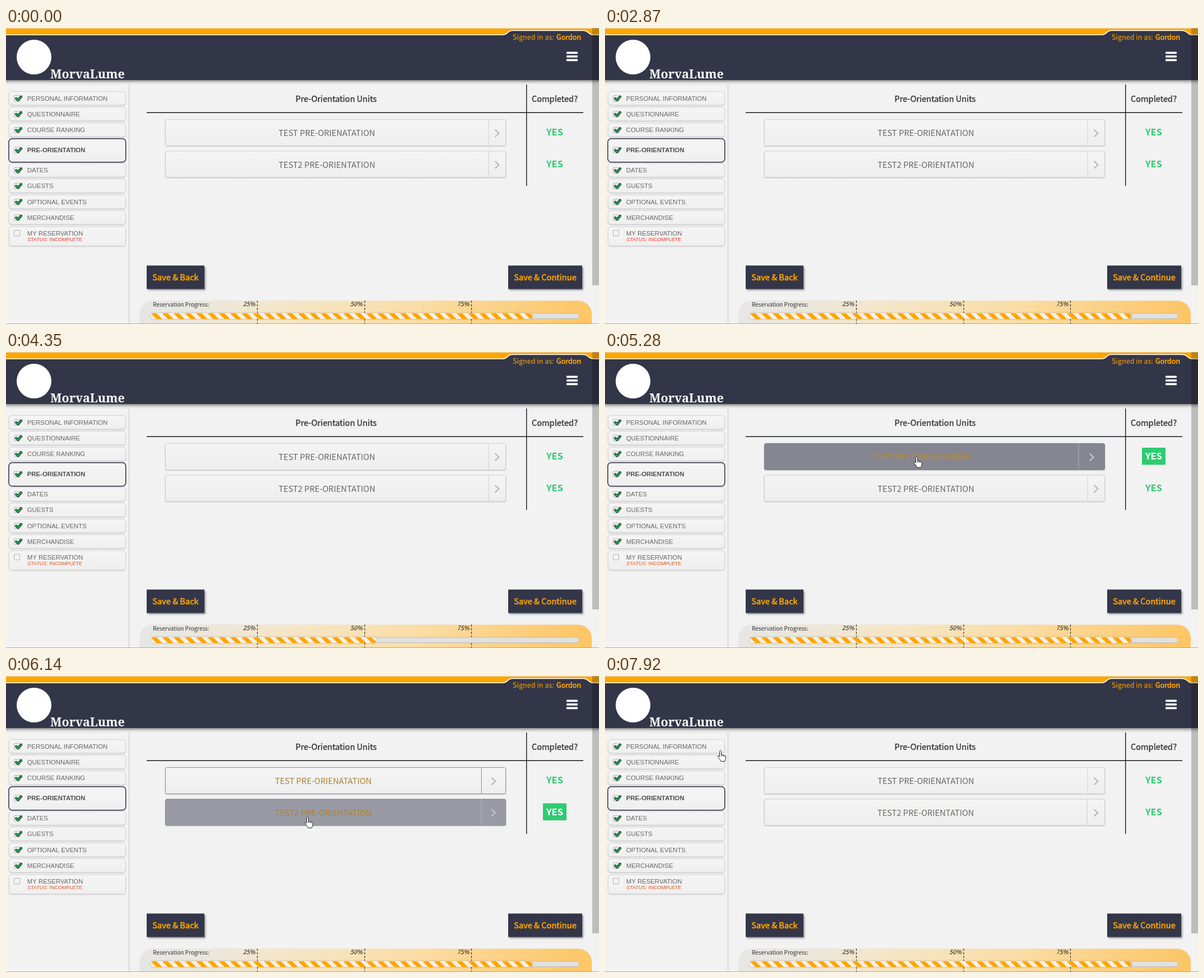
Animation, 1058 px wide and 529 px high, one loop 8000 ms. Source, as an HTML page with a canvas:

```html
<!DOCTYPE html>
<html lang="en">
<head>
<meta charset="utf-8">
<title>Pre-Orientation</title>
<style>
html, body { margin: 0; width: 100%; height: 100%; overflow: hidden; background: #f2f2f2; }
canvas { display: block; width: 1058px; height: 529px; }
</style>
</head>
<body>
<canvas id="stage" width="1058" height="529"></canvas>
<script>
const ctx = document.getElementById('stage').getContext('2d');
const LOOP = 8000, FADE = 600;
const NAVY = '#333648', GOLD = '#ffa500', GREEN = '#2ecc71';
const SANS = '"Noto Sans CJK SC", "Noto Sans CJK JP", "Noto Sans CJK", "Open Sans", sans-serif';
const ARIAL = '"Liberation Sans", Arial, sans-serif';
const SERIF = '"Noto Serif", serif';

// Bursts of motion: start, end, step count
const bursts = [
  [310, 1080, 11], [1160, 1160, 1], [1540, 2310, 11], [2390, 2870, 7],
  [3870, 4670, 11], [4740, 5510, 11], [5630, 5680, 2], [5830, 6530, 10],
  [6990, 7770, 11], [7850, 7920, 2]
];

// Pointer paths: time, x, y
const paths = [
  [[310, 715, 528], [1080, 158, 13], [1159, 101, -40]],
  [[1540, 145, 5], [1770, 96, 58], [1925, 52, 95], [2080, 37, 82], [2310, 82, 46],
   [2390, 96, 39], [2790, 80, 7], [2869, 77, -20]],
  [[4590, 80, -40], [4740, 260, 46], [5080, 505, 163], [5280, 556, 187], [5830, 556, 187],
   [6140, 538, 252], [6990, 538, 253], [7440, 284, 228], [7770, 223, 145],
   [7920, 206, 133], [8000, 206, 133]]
];

const rows = [
  { y: 164, label: 'TEST PRE-ORIENATATION', hover: [[784, 856], [5080, 5950]] },
  { y: 220.5, label: 'TEST2 PRE-ORIENTATION', hover: [[701, 771], [5975, 7440]] }
];

const nav = [
  ['PERSONAL INFORMATION', 113, 25], ['QUESTIONNAIRE', 141, 25], ['COURSE RANKING', 169.5, 25],
  ['PRE-ORIENTATION', 197, 42], ['DATES', 241.5, 25], ['GUESTS', 269.5, 25],
  ['OPTIONAL EVENTS', 298, 25], ['MERCHANDISE', 326, 25], ['MY RESERVATION', 354.5, 35]
];

const hand = new Path2D('M3.5 1.8c0-2 3-2 3 0v5.7l6 1.5q2.5 .6 2 3l-.8 4.5-1.2 3h-6.7l-1.2-2.8-4-5q-1.3-2.4 1.5-2.2l1.4 1.7z');
const arrow = new Path2D('M.5 .8v14.2l3.3-3.1 2.2 4.7 2.2-1-2.2-4.6h4.5z');

const clamp = v => Math.max(0, Math.min(1, v));
const lerp = (a, b, p) => a + (b - a) * p;
const swing = p => 0.5 - Math.cos(clamp(p) * Math.PI) / 2;
const mix = (a, b, p) => `rgb(${a.map((v, i) => Math.round(lerp(v, b[i], p)))})`;

// CSS "ease": cubic-bezier(.25, .1, .25, 1)
function ease(x) {
  x = clamp(x);
  let lo = 0, hi = 1;
  for (let i = 0; i < 20; i++) {
    const s = (lo + hi) / 2;
    const bx = 0.75 * s * (1 - s) + s * s * s;
    if (bx < x) lo = s; else hi = s;
  }
  return 0.3 * lo * (1 - lo) * (1 - lo) + 3 * lo * lo * (1 - lo) + lo * lo * lo;
}

function snap(t) {
  let held = 0;
  for (const [a, b, n] of bursts) {
    if (t < a) break;
    const step = n > 1 ? (b - a) / (n - 1) : 1;
    held = Math.min(b, a + Math.floor((t - a + 3) / step) * step);
  }
  return held;
}

function pointer(t) {
  for (const path of paths) {
    for (let i = 1; i < path.length; i++) {
      const [t0, x0, y0] = path[i - 1], [t1, x1, y1] = path[i];
      if (t >= t0 && t <= t1) {
        const p = (t - t0) / (t1 - t0);
        return { x: lerp(x0, x1, p), y: lerp(y0, y1, p) };
      }
    }
  }
  return null;
}

function hoverState(row, t) {
  let level = 0, on = false;
  for (const [a, b] of row.hover) {
    if (t < a) break;
    on = t < b;
    level = ease((Math.min(t, b) - a) / FADE);
    if (!on) level *= 1 - ease((t - b) / (FADE * level));
  }
  return { level, on };
}

function text(s, x, y, font, color, { align = 'left', heavy = 0 } = {}) {
  ctx.font = font;
  ctx.textAlign = align;
  ctx.fillStyle = color;
  ctx.fillText(s, x, y);
  if (heavy) {
    ctx.strokeStyle = color;
    ctx.lineWidth = heavy;
    ctx.strokeText(s, x, y);
  }
}

function box(x, y, w, h, r, fill, stroke, lw = 1) {
  ctx.beginPath();
  ctx.roundRect(x, y, w, h, r);
  if (fill) { ctx.fillStyle = fill; ctx.fill(); }
  if (stroke) { ctx.strokeStyle = stroke; ctx.lineWidth = lw; ctx.stroke(); }
}

function line(points, color, lw) {
  ctx.beginPath();
  points.forEach(([x, y]) => ctx.lineTo(x, y));
  ctx.strokeStyle = color;
  ctx.lineWidth = lw;
  ctx.stroke();
}

function shadowed(color, dx, dy, blur, draw) {
  ctx.save();
  ctx.shadowColor = color;
  ctx.shadowOffsetX = dx;
  ctx.shadowOffsetY = dy;
  ctx.shadowBlur = blur;
  draw();
  ctx.restore();
}

function gradient(x0, y0, x1, y1, stops) {
  const g = ctx.createLinearGradient(x0, y0, x1, y1);
  stops.forEach(([p, c]) => g.addColorStop(p, c));
  return g;
}

function header() {
  shadowed('rgba(0,0,0,.55)', 0, 2, 6, () => {
    ctx.fillStyle = NAVY;
    ctx.fillRect(-10, 10, 1078, 83);
  });
  ctx.fillStyle = GOLD;
  ctx.fillRect(0, 0, 1058, 12);
  ctx.fillStyle = '#e8dcc4';
  ctx.fillRect(0, 0, 1058, 1);
  ctx.beginPath();
  ctx.moveTo(-2, 12.3);
  ctx.lineTo(886, 12.3);
  ctx.bezierCurveTo(896, 12, 894, 4.5, 904, 4.5);
  ctx.lineTo(1029, 4.5);
  ctx.bezierCurveTo(1040, 4.5, 1038, 12, 1048, 12.3);
  ctx.lineTo(1060, 12.3);
  ctx.strokeStyle = '#fff';
  ctx.lineWidth = 1.6;
  ctx.fillStyle = NAVY;
  ctx.fill();
  ctx.stroke();

  ctx.beginPath();
  ctx.arc(50, 52, 31, 0, Math.PI * 2);
  ctx.fillStyle = '#fff';
  ctx.fill();
  text('MorvaLume', 79, 90, `bold 21.5px ${SERIF}`, '#fff');

  text('Signed in as:', 904, 20.5, `12.6px ${SANS}`, GOLD);
  text('Gordon', 982, 20.5, `12.6px ${SANS}`, GOLD, { heavy: 0.6 });
  for (let i = 0; i < 3; i++) box(1000, 42.5 + i * 6.5, 20, 3.8, 0.8, '#fff');
}

function checkbox(y, checked) {
  box(14.5, y - 5, 10, 10, 1.5, '#f4f4f4', '#b0b0b0');
  if (!checked) return;
  ctx.lineCap = ctx.lineJoin = 'round';
  const tick = [[18.2, y + 0.2], [21.4, y + 3.2], [27, y - 3]];
  line(tick, '#1c2b22', 4.4);
  line(tick, '#21b35f', 2.2);
  ctx.lineCap = 'butt';
  ctx.lineJoin = 'miter';
}

function sidebar(t) {
  ctx.fillStyle = '#c6c6c6';
  ctx.fillRect(219, 101, 1, 428);
  nav.forEach(([label, y, h], i) => {
    const active = i === 3, last = i === 8;
    const mid = last ? y + 12 : y + h / 2 + 0.3;
    const fill = gradient(0, y, 0, y + h, [[0, '#f5f5f5'], [1, '#efefef']]);
    shadowed('rgba(0,0,0,.22)', 0, 1, 2, () => box(5.5, y + 0.5, 208, h - 0.5, 5, fill));
    if (active) box(5, y + 0.8, 208.7, h, 6, fill, '#2b2e40', 1.5);
    else box(5.5, y + 0.5, 208, h - 0.5, 5, fill, '#d2d2d2');
    checkbox(mid, !last);
    text(label, 37.8, mid + 4, `${active ? 'bold ' : ''}11.35px ${ARIAL}`, active ? '#505050' : '#666');
  });
  const red = t < 3870 ? '#ee3a2a' : '#e2531f';
  text('STATUS:', 38, 381, `italic 9px ${ARIAL}`, red);
  text('INCOMPLETE', 77.5, 381, `9px ${ARIAL}`, red);
}

function unitRow(row, t) {
  const { level: p, on } = hoverState(row, t);
  const { y, label } = row;
  const fill = on ? mix([242, 242, 242], [51, 54, 72], p)
    : gradient(0, y, 0, y + 47, [[0, '#f4f4f4'], [1, '#eeeeee']]);
  const edge = mix([208, 208, 208], [60, 62, 76], p);
  const split = 861 - 28 * p;
  shadowed('rgba(0,0,0,.25)', 0, 1, 2, () => box(284, y - 0.5, 608, 47, 3, fill));
  box(284.5, y - 0.5, 607, 47, 3, fill, edge);
  line([[split, y], [split, y + 46]], on ? mix([208, 208, 208], [150, 152, 162], p) : edge, 1);

  const cx = (split + 891) / 2, cy = y + 24;
  line([[cx - 3.5, cy - 6.5], [cx + 3.5, cy], [cx - 3.5, cy + 6.5]],
    on ? mix([178, 178, 178], [225, 225, 228], p) : '#b4b4b4', 2);
  text(label, (284 + split) / 2, y + 29.2, `14.65px ${SANS}`,
    mix([102, 102, 102], [255, 165, 0], p), { align: 'center' });

  if (on) box(958, y + 7, 42, 30.5, 0, GREEN);
  text('YES', 979, y + 28.2, `bold 16.4px ${SANS}`, on ? '#fff' : GREEN, { align: 'center' });
}

function button(label, x, w) {
  shadowed('rgba(0,0,0,.4)', 2, 2, 3, () => box(x, 424.5, w, 42, 0, NAVY));
  text(label, x + w / 2, 451.3, `14.6px ${SANS}`, GOLD, { align: 'center', heavy: 0.55 });
}

function content(t) {
  ctx.fillStyle = '#16181e';
  ctx.fillRect(251, 150.5, 779, 1.5);
  ctx.fillRect(928, 101, 1.4, 181);
  const head = { align: 'center', heavy: 0.4 };
  text('Pre-Orientation Units', 589, 132, `14.6px ${SANS}`, '#3a3a3a', head);
  text('Completed?', 979, 132, `14.6px ${SANS}`, '#3a3a3a', head);
  rows.forEach(row => unitRow(row, t));
  button('Save & Back', 251, 103);
  button('Save & Continue', 896, 132);
}

function progress(t) {
  const panel = gradient(238, 0, 1045, 0, [
    [0, '#e6e6e4'], [0.1, '#e9e7e1'], [0.32, '#f5e6c8'], [0.6, '#fbdea8'], [1, '#fdc564']
  ]);
  shadowed('rgba(225,215,190,.6)', 0, 0, 2, () => box(238.5, 487.5, 806.5, 70, 24, panel));

  text('Reservation Progress:', 262, 497.5, `10px ${SANS}`, '#333');
  [[448.5, '25%'], [640, '50%'], [830.5, '75%']].forEach(([x, label]) => {
    ctx.setLineDash([4, 2.5]);
    line([[x, 487], [x, 529]], '#333', 1.2);
    ctx.setLineDash([]);
    text(label, x - 4, 497.3, `italic 10.7px ${SANS}`, '#333', { align: 'right', heavy: 0.15 });
  });

  box(258.5, 510, 764, 9.5, 5, '#e1e1e0', '#bdbab2');
  const share = t >= 3870 ? swing((t - 3945) / 725) : 1;
  const w = 681 * share;
  if (w < 2) return;
  shadowed('rgba(120,80,0,.5)', 0, 0, 3, () => box(258, 509.5, w, 10.5, 5, '#fff'));
  ctx.save();
  ctx.beginPath();
  ctx.roundRect(258, 509.5, w, 10.5, 5);
  ctx.clip();
  ctx.fillStyle = '#f4f0e6';
  ctx.fillRect(258, 509, w, 12);
  ctx.fillStyle = GOLD;
  const pitch = 20.2, half = pitch / 2;
  for (let x = 258 - pitch; x < 258 + w; x += pitch) {
    ctx.beginPath();
    ctx.moveTo(x, 509.5);
    ctx.lineTo(x + half, 509.5);
    ctx.lineTo(x + half + 10.5, 520);
    ctx.lineTo(x + 10.5, 520);
    ctx.fill();
  }
  ctx.restore();
}

function drawPointer(t) {
  const at = pointer(t);
  if (!at) return;
  const overRow = rows.some(row => hoverState(row, t).on);
  const overNav = at.x < 213 && at.y > 113;
  const isHand = overRow || overNav;
  const shape = isHand ? hand : arrow;
  ctx.save();
  ctx.translate(Math.round(at.x) - (isHand ? 5 : 0), Math.round(at.y));
  ctx.fillStyle = '#fff';
  ctx.strokeStyle = '#222';
  ctx.lineWidth = 1;
  ctx.fill(shape);
  ctx.stroke(shape);
  if (isHand) {
    line([[6.5, 7.5], [6.5, 11]], '#222', 0.8);
    line([[9.3, 8.5], [9.3, 11]], '#222', 0.8);
    line([[12, 9.3], [12, 11.5]], '#222', 0.8);
  }
  ctx.restore();
}

function render(t) {
  ctx.fillStyle = '#f2f2f2';
  ctx.fillRect(0, 0, 1058, 529);
  header();
  sidebar(t);
  content(t);
  progress(t);
  ctx.fillStyle = 'rgba(0,0,0,.22)';
  ctx.fillRect(1046, 0, 12, 460);
  ctx.fillStyle = '#a9a9a9';
  ctx.fillRect(0, 528, 1058, 1);
  drawPointer(t);
}

const start = performance.now();
function tick() {
  render(snap((performance.now() - start) % LOOP));
  requestAnimationFrame(tick);
}
tick();
</script>
</body>
</html>
```
